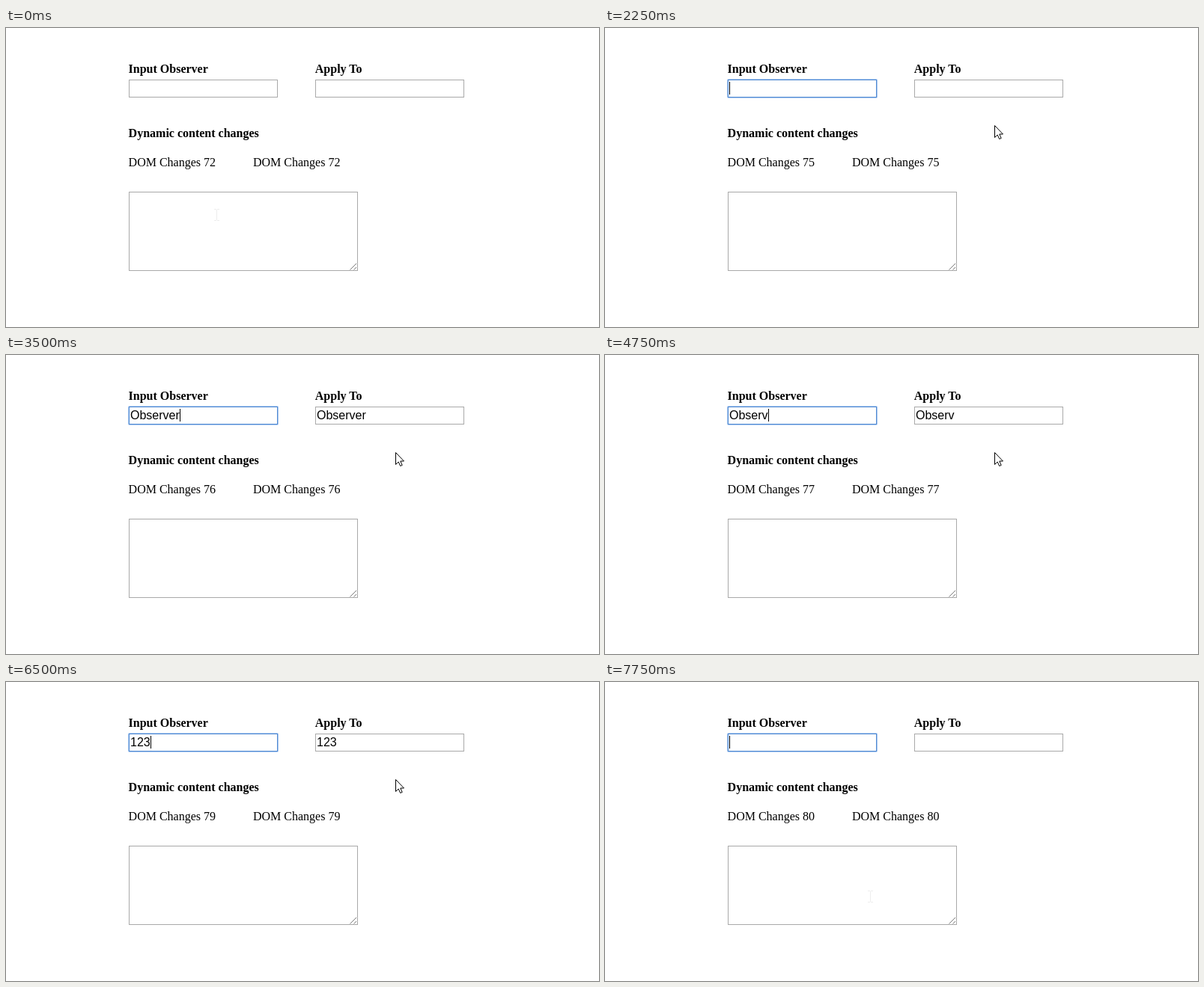
Recreate the animation shown at these times as an HTML page. Size 792 px wide and 400 px high, loop 8000 ms.

```html
<!DOCTYPE html>
<html lang="en">
<head>
<meta charset="utf-8">
<title>Input observer</title>
<style>
  html, body { margin: 0; width: 100%; height: 100%; overflow: hidden; background: #fff; }
  svg { display: block; }
  text { font: 16px "Liberation Serif", "Times New Roman", serif; fill: #000; white-space: pre; }
  .bold { font-weight: bold; }
  .typed { font-family: "Liberation Sans", Arial, sans-serif; }
  .box { fill: #fff; stroke: #a9a9a9; }
</style>
</head>
<body>
<svg width="792" height="400" viewBox="0 0 792 400">
  <rect width="792" height="400" fill="#fff"/>
  <text class="bold" x="163.6" y="60">Input Observer</text>
  <text class="bold" x="412.8" y="60">Apply To</text>
  <text class="bold" x="163.6" y="146">Dynamic content changes</text>
  <text class="count" x="163.6" y="185"></text>
  <text class="count" x="330" y="185"></text>

  <rect class="box" x="164.5" y="69.5" width="198" height="23"/>
  <rect class="box" x="413.5" y="69.5" width="198" height="23"/>
  <rect class="box" x="164.5" y="219.5" width="305" height="105"/>
  <path d="M459.5 323.5l8.5-8.5M464.5 323.5l3.5-3.5" fill="none" stroke="#7a7a7a"/>

  <g id="focus" fill="none">
    <rect x="163.5" y="68.5" width="200" height="25" rx="1" stroke="#a9c8f0"/>
    <rect x="164.5" y="69.5" width="198" height="23" stroke="#5089d2"/>
  </g>
  <text class="typed" x="166" y="86"></text>
  <text class="typed" x="415" y="86"></text>
  <rect id="caret" y="72" width="1" height="17"/>

  <path id="beam" d="M-3.5 -7.5h3M.5 -7.5h3M0 -7v14M-3.5 7.5h3M.5 7.5h3" fill="none" stroke="#ededed"/>
  <path id="arrow" d="M.5 .5V16.5L4.2 13L6.7 18.5L9.2 17.4L6.8 12H11.5Z" fill="#fff" stroke="#000"/>
</svg>
<script>
const LOOP = 8000;
const $ = id => document.getElementById(id);
const counts = document.querySelectorAll('.count');
const typed = document.querySelectorAll('.typed');

// each track: [start ms, value]
const words = [[0, ''], [2500, 'O'], [2750, 'Obs'], [3000, 'Obse'], [3250, 'Obser'],
  [3500, 'Observer'], [4750, 'Observ'], [5000, 'Obser'], [5250, 'Obs'], [5500, 'O'],
  [5750, ''], [6250, '1'], [6500, '123'], [6750, '12'], [7000, '']];
const carets = [[0, false], [1000, true], [1500, false], [2250, true], [4250, false], [4750, true]];
const pointer = [[0, ['beam', 281.5, 250]], [250, ['beam', 280.5, 246]],
  [750, ['beam', 253.5, 95]], [1000, ['beam', 250.5, 88]],
  [1250, ['arrow', 525, 136]], [1500, ['arrow', 520, 130]], [7750, ['beam', 354.5, 287]]];

const at = (track, t) => track.filter(step => step[0] <= t).pop()[1];
const show = (el, on) => el.setAttribute('visibility', on ? 'visible' : 'hidden');

function write(el, text) {
  if (el.textContent !== text) el.textContent = text;
}

function draw(t) {
  // the counter ticks once a second, a quarter second after each full one
  const count = 72 + Math.floor((t + 750) / 1000);
  counts.forEach(el => write(el, 'DOM Changes ' + count));

  const word = at(words, t);
  typed.forEach(el => write(el, word));
  show($('focus'), t >= 1000);
  show($('caret'), at(carets, t));
  const width = word ? typed[0].getComputedTextLength() : 0;
  $('caret').setAttribute('x', 166 + Math.round(width));

  const [kind, x, y] = at(pointer, t);
  for (const id of ['beam', 'arrow']) show($(id), id === kind);
  $(kind).setAttribute('transform', `translate(${x} ${y})`);
}

const start = performance.now();
function tick() {
  draw((performance.now() - start) % LOOP);
  requestAnimationFrame(tick);
}
tick();
</script>
</body>
</html>
```
